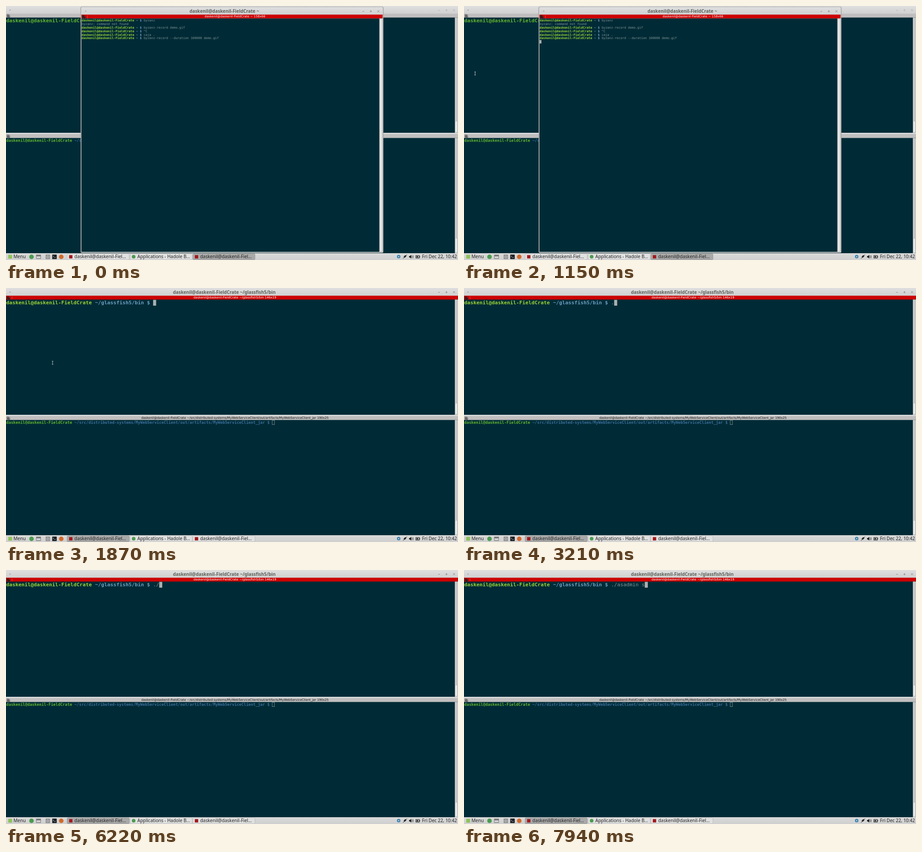
These frames come from a looping animation (998 by 561 pixels, 8 s). An HTML page:

```html
<!DOCTYPE html>
<html lang="en">
<head>
<meta charset="utf-8">
<title>Terminal session</title>
<style>
  html, body { margin: 0; width: 100%; height: 100%; overflow: hidden; background: #002b36; }
  svg { display: block; }
  text { white-space: pre; font: 10px "Noto Sans", sans-serif; fill: #222; }
  .title { font-weight: bold; font-size: 9.9px; text-anchor: middle; fill: #5d625b; }
  .label { font: 6.757px "DejaVu Sans", sans-serif; text-anchor: middle; fill: #111; }
  .mono { font-family: "DejaVu Sans Mono", monospace; fill: #839496; }
  .user, .path { font-weight: bold; }
  .user { fill: #9bd237; }
  .path { fill: #6a9cc0; }
  .blur .user { fill: #62b42f; }
  .blur .path { fill: #3b6e9c; }
  .blur .title { fill: #a9a9a9; }
  .controls { fill: none; stroke: #858585; stroke-width: .9; }
  .blur .controls { stroke: #b0b0b0; }
  .strip { fill: #c00; }
  .blur .strip { fill: #c0bebe; }
  .strip + .label { fill: #fff; }
  .blur .strip + .label { fill: #111; }
  .grip { fill: #222; stroke: #222; stroke-width: .8; }
  .blur .grip { fill: none; }
  .notch { stroke: #e88; stroke-width: .6; }
  .blur .notch { display: none; }
  .button { fill: #e0e0e0; stroke: #b3b3b3; stroke-width: .7; }
  .button.active { fill: #a9a9a9; stroke: #888; }
</style>
</head>
<body>
<svg id="stage" width="998" height="561" viewBox="0 0 998 561"></svg>
<script>
const USER = 'daskenil@daskenil-FieldCrate';
const GLASSFISH = '~/glassfish5/bin';
const CLIENT = '~/src/distributed-systems/MyWebServiceClient/out/artifacts/MyWebServiceClient_jar';
const LOOP = 8000, CELL = 6.757, SMALL_CELL = 4.158, PROMPT_END = 324.8;

const rect = (x, y, w, h, fill, extra = '') =>
  `<rect x="${x}" y="${y}" width="${w}" height="${h}" fill="${fill}" ${extra}/>`;
const label = (x, y, text, cls = '') => `<text x="${x}" y="${y}" class="${cls}">${text}</text>`;
const dot = (x, y, r, fill) => `<circle cx="${x}" cy="${y}" r="${r}" fill="${fill}"/>`;
const line = (d, stroke, width = .8) =>
  `<path d="${d}" fill="none" stroke="${stroke}" stroke-width="${width}"/>`;

const prompt = (x, y, cell, path, rest) =>
  `<text class="mono" x="${x}" y="${y}" style="font-size:${cell / .602}px">` +
  `<tspan class="user">${USER}</tspan><tspan class="path"> ${path} $ </tspan>${rest}</text>`;

const titleBar = (x, y, w, title, center) =>
  rect(x, y, w, 17, 'url(#bar)') + label(center, y + 12.7, title, 'title') +
  `<g class="controls"><path d="M${x + 7} ${y + 8.2}h4l-2 2.2z" fill="#999" stroke="none"/>
   <path d="M${x + w - 44} ${y + 9.5}h4M${x + w - 28} ${y + 9.3}h5m-2.5-2.5v5
   M${x + w - 11} ${y + 7}l4.4 4.4m0-4.4l-4.4 4.4"/></g>`;

const strip = (x, y, w, text, center) =>
  `<rect class="strip" x="${x}" y="${y}" width="${w}" height="8.5"/>` +
  label(center, y + 6.4, text, 'label') +
  `<path class="grip" d="M${x + 2.5} ${y + 1.8}h3v3h-3zM${x + 2.5} ${y + 4.8}h3v2.6h-3zM${x + 5.5} ${y + 4.8}h2.8v2.6h-2.8z"/>
   <path d="M${x + 6.5} ${y + 2.6}h2" stroke="#222" stroke-width=".8"/>
   <path class="notch" d="M${x + 13.3} ${y + 1}v6.5"/>`;

const scrollbar = (x, y, h, thumbY, thumbH) =>
  rect(x, y, 7, h, '#c6c6c6') +
  rect(x + .8, thumbY, 5, thumbH, '#e9e9e9', 'rx="2" stroke="#a5a5a5" stroke-width=".6"');

const backWindow = `
  <g id="top" class="blur">
    ${titleBar(0, 0, 998, `${USER} ${GLASSFISH}`, 482)}
    ${strip(0, 17, 998, `${USER} ${GLASSFISH} 146x19`, 505.5)}
    ${prompt(.5, 36.4, CELL, GLASSFISH, '<tspan id="typed"></tspan>')}
    <rect id="cursor" y="26.2" width="6.7" height="12.8"/>
  </g>
  ${scrollbar(991, 25.5, 254.5, 254, 25)}
  ${rect(0, 280, 998, 3, '#d6d6d6')}
  ${line('M492 281.6h13', '#999', .8).replace('/>', ' stroke-dasharray="1 1.6"/>')}
  <g class="blur">
    ${strip(0, 283, 998, `${USER} ${CLIENT} 190x25`, 505.5)}
    ${prompt(.5, 299.7, 5.198, CLIENT, '')}
    ${rect(587.8, 292.3, 5, 9.4, 'none', 'stroke="#a0a8a8" stroke-width=".7"')}
  </g>
  ${scrollbar(991, 291.5, 254.5, 513, 32)}`;

const history = ['byzanz', null, 'byzanz-record demo.gif', '^C', 'caja .',
  'byzanz-record --duration 100000 demo.gif'];
const historyLines = history.map((command, i) => {
  const y = 34.4 + i * 7.797;
  return command ? prompt(167, y, SMALL_CELL, '~', command) :
    `<text class="mono" x="167" y="${y}" style="font-size:${SMALL_CELL / .602}px">byzanz: command not found</text>`;
}).join('');

const frontWindow = `
  <g id="front">
    ${rect(165, 2, 668, 543, '#d4d4d4', 'rx="2" stroke="#777" stroke-width=".7"')}
    ${titleBar(167, 2.4, 664, `${USER} ~`, 482)}
    ${strip(166.5, 19, 665, `${USER} ~ 158x66`, 505.5)}
    ${rect(166.5, 27.5, 658, 515.5, '#002b36')}
    ${scrollbar(824.5, 27.5, 515.5, 28, 514.5)}
    ${historyLines}
    <rect id="smallCursor" x="167" y="75.2" width="4" height="7.6" fill="#aab0b0"/>
  </g>`;

const button = (id, x, text, icon) =>
  `<rect id="${id}" class="button" x="${x}" y="547.3" width="137" height="13" rx="2"/>` +
  icon + label(x + 16, 557.4, text);
const redSquare = x => rect(x - 3.7, 550.2, 7.4, 7.4, '#a3191c');
const shortName = USER.slice(0, 22) + '...';

const taskbar = `
  ${rect(0, 546, 998, 15, 'url(#panel)')}
  ${rect(5, 549.5, 8.5, 8.5, '#8fc25a', 'rx="1"')}
  ${label(16.5, 557.4, 'Menu')}
  ${dot(56.3, 554, 5, '#4c9b50')}
  ${rect(66.5, 549.3, 10.6, 9, '#777')}${rect(67.5, 553, 8.6, 4, '#d5d5d5')}
  ${rect(87.5, 549, 9.6, 10, '#909090', 'rx="1"')}${line('M88.5 554h7.6M90.5 551.5h3.6M90.5 556.5h3.6', '#ddd')}
  ${rect(102, 549, 10, 10, '#1d2226', 'rx="1"')}${line('M103.5 551.5l2 1.6-2 1.6M106.5 555.5h3', '#ddd')}
  ${dot(122, 554, 5, '#d2692b')}
  ${button('topButton', 135, shortName, redSquare(143))}
  ${button('appButton', 274, 'Applications - Hadole B...', dot(281.8, 553.8, 4, '#4c9b50'))}
  ${button('frontButton', 412.7, shortName, redSquare(420.6))}
  ${dot(867, 553.6, 4.6, '#eee')}${dot(867, 553.6, 4, '#4384ac')}${dot(867, 553.6, 1.2, '#eee')}
  ${line('M876.5 558l3-3m2.5-2.5l3.5-3.5', '#222', 1)}${line('M879 555l4-3.8', '#222', 3.4)}
  <path d="M890 552h2.2l2.8-2.6v8.6l-2.8-2.6H890z" fill="#222"/>
  ${line('M896.5 551.8q1.5 2 0 4M898 550.2q2.8 3.6 0 7.2', '#222')}
  ${line('M905 551h7.6v5.6H905zM913.6 552.6v2.4', '#222', 1.1)}${rect(906.4, 552.4, 3.8, 2.8, '#222')}
  ${label(918.6, 557.4, 'Fri Dec 22, 10:42')}`;

const gradient = (id, from, to) =>
  `<linearGradient id="${id}" x2="0" y2="1"><stop stop-color="${from}"/><stop offset="1" stop-color="${to}"/></linearGradient>`;

document.getElementById('stage').innerHTML = `
  <defs>${gradient('bar', '#dfdfdf', '#d0d0d0')}${gradient('panel', '#d9d9d9', '#cfcfcf')}</defs>
  ${rect(0, 0, 998, 561, '#002b36')}
  ${backWindow}${frontWindow}${taskbar}
  <g id="pointer">${line('M-1.5-3.5h3M0-3.5v7M-1.5 3.5h3', '#e4e4e4', .8)}</g>`;

const get = id => document.getElementById(id);
const [topPane, typed, cursor, front, smallCursor, topButton, frontButton, pointer] =
  ['top', 'typed', 'cursor', 'front', 'smallCursor', 'topButton', 'frontButton', 'pointer'].map(get);
const show = (el, visible) => el.setAttribute('visibility', visible ? 'inherit' : 'hidden');

const COMMAND = './asadmin s';
const KEY_TIMES = [3210, 3850, 6410, 6620, 6790, 6940, 7020, 7120, 7220, 7330, 7940];
const CURSOR_OFF = [[1990, 2590], [4420, 5020], [5620, 6220], [7900, 7940]];

// The pointer moves in 40 ms steps: first to the left pane, then away after the click.
function pointerAt(t) {
  const steps = (start, count) => Math.min(1, Math.max(0, Math.floor((t - start) / 40) / count));
  const ease = p => p * p * (3 - 2 * p);
  const a = ease(steps(710, 11)), b = ease(steps(1830, 4));
  return [533 - 508.5 * a + 501.5 * b, 169 - 20 * a + 103.5 * b];
}

function render(t) {
  const focused = t >= 1500;
  show(front, t < 1450);
  show(smallCursor, (t >= 40 && t < 560) || t >= 1150);
  topPane.setAttribute('class', focused ? '' : 'blur');
  topButton.classList.toggle('active', focused);
  frontButton.classList.toggle('active', !focused);

  const count = KEY_TIMES.filter(time => t >= time).length;
  typed.textContent = COMMAND.slice(0, count);
  cursor.setAttribute('x', PROMPT_END + count * CELL);
  cursor.setAttribute('fill', focused ? '#aab0b0' : 'none');
  cursor.setAttribute('stroke', focused ? 'none' : '#a0a8a8');
  cursor.setAttribute('stroke-width', .7);
  show(cursor, !CURSOR_OFF.some(([from, to]) => t >= from && t < to));

  show(pointer, t >= 710 && t < 3170);
  pointer.setAttribute('transform', `translate(${pointerAt(t)})`);
}

const start = performance.now();
function tick() {
  render((performance.now() - start) % LOOP);
  requestAnimationFrame(tick);
}
tick();
</script>
</body>
</html>
```
